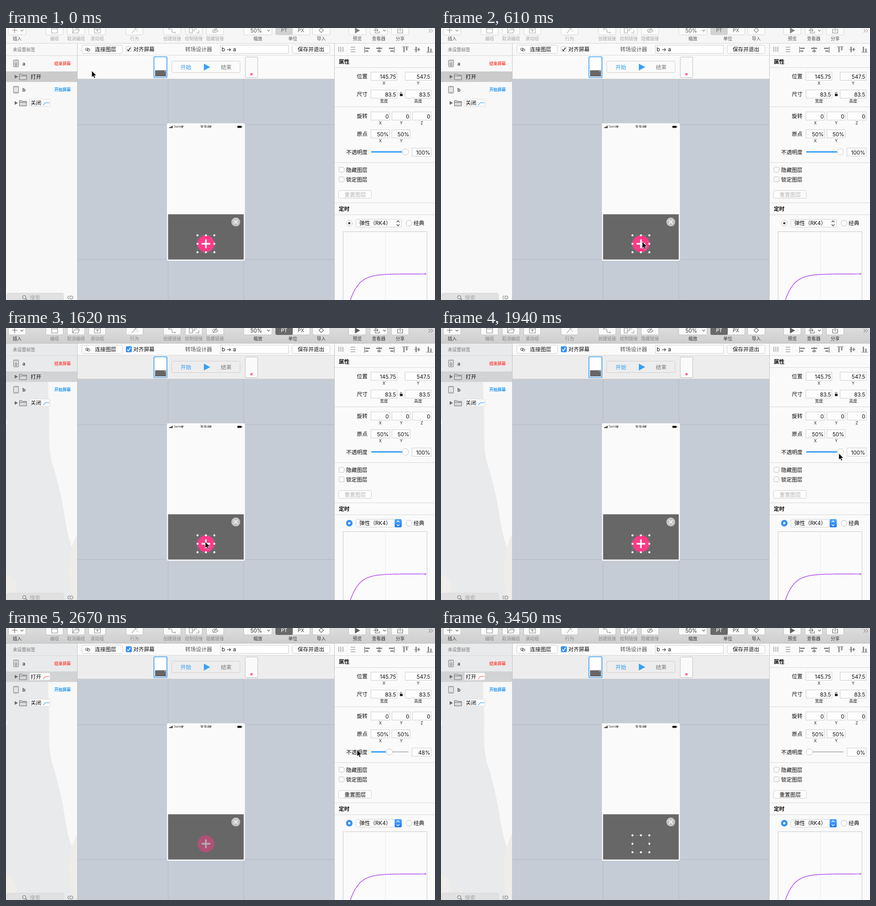
An HTML page that plays this animation: 941x595 px, repeating every 4050 ms.

```html
<!DOCTYPE html>
<html lang="zh-CN">
<head>
<meta charset="utf-8">
<title>转场设计器</title>
<style>
html, body { margin: 0; width: 100%; height: 100%; overflow: hidden; background: #fafafa }
svg { display: block; width: 100%; height: 100%; font-family: Inter, "Noto Sans CJK SC", "Noto Sans CJK", sans-serif;
  --bar: #f6f6f6; --barLow: #f6f6f6; --edge: #d6d6d6; --btn: #fbfbfb; --ink: #555; --icon: #858585; --dim: #a8a8a8;
  --sub: #fafafa; --row: #cbcbcb; --seg: #d2d2d2; --segInk: #777 }
svg.on { --bar: #dcdcdc; --barLow: #cfcfcf; --edge: #bdbdbd; --btn: #fafafa; --ink: #333; --icon: #5e5e5e; --dim: #888;
  --sub: #ededed; --row: #d2d3d4; --seg: #696969; --segInk: #fff }
svg:not(.on) .on, svg.on .off { display: none }
</style>
</head>
<body>
<svg id="stage" viewBox="0 0 941 595"></svg>
<script>
const stage = document.getElementById('stage');
const rect = (x, y, w, h, fill, stroke = 'none', r = 0, more = '') =>
  `<rect x="${x}" y="${y}" width="${w}" height="${h}" rx="${r}" style="fill:${fill};stroke:${stroke}" ${more}/>`;
const path = (d, stroke, width = 1, fill = 'none') =>
  `<path d="${d}" style="fill:${fill};stroke:${stroke};stroke-width:${width}"/>`;
const dot = (x, y, r, fill, stroke = 'none', more = '') =>
  `<circle cx="${x}" cy="${y}" r="${r}" style="fill:${fill};stroke:${stroke}" ${more}/>`;
// y is the middle of the line of text
const text = (s, x, y, size = 11.7, fill = '#0c0c0c', anchor = 'start', weight = 400, more = '') =>
  `<text x="${x}" y="${y + size * .365}" text-anchor="${anchor}" style="fill:${fill};font-size:${size}px;font-weight:${weight}" ${more}>${s}</text>`;
const mid = (s, x, y, size, fill, weight) => text(s, x, y, size, fill, 'middle', weight);
const group = (cls, ...parts) => `<g class="${cls}">${parts.join('')}</g>`;
const part = (id, ...parts) => `<g id="${id}">${parts.join('')}</g>`;
const hline = (x1, x2, y, c = '#d9d9d9') => rect(x1, y, x2 - x1, 1, c);
const vline = (x, y1, y2, c) => rect(x, y1, 1, y2 - y1, c);
const INK = 'var(--ink)', ICON = 'var(--icon)', DIM = 'var(--dim)';
const BLUE = '#2e9bf5', ACCENT = '#3490f8', RED = '#ff5048', LINE = '#cecece', PINK = '#ff3b87';

function toolbar() {
  const items = [ // label, left, width, enabled, icon
    ['插入', 5, 39, 1, 'M13 5h12M19-1v12M32 4l3 3 3-3'],
    ['编组', 87, 39, 0, 'M100-1h13v12h-13zM100 2h13'],
    ['取消编组', 134, 39, 0, 'M146 11V-1h5l2 2h6v3M146 11l4-7h11l-3 7z'],
    ['滚动组', 181, 38, 0, 'M194-1h13v12h-13zM194 2h13M200.500 4v5M198 6l2.500-2 2.500 2'],
    ['行为', 263, 38, 0, 'M276 11l8-9M282-1l2 3 3 1M288-1v2M288 6v2'],
    ['创建链接', 345, 39, 0, 'M357 2h4q3 0 3 4t3 4h4M371 8v4M357 0v4'],
    ['绘制链接', 393, 38, 0, 'M402 11V0h7v11zM409 6h4V2h6M417 11h6V5'],
    ['隐藏链接', 439, 39, 0, 'M452 6q6-8 13 0q-7 7-13 0M454 11l9-12M457 6a2 2 0 0 1 4 0'],
    ['缩放', 521, 63, 1, 'M573 4l3 3 3-3'],
    ['单位', 591, 76, 1, ''],
    ['导入', 672, 39, 1, 'M691.500 0l5 5-5 5-5-5z'],
    ['预览', 751, 39, 1, 'M766 0v11l9.500-5.500z'],
    ['查看器', 798, 39, 1, 'M815 0h-5v11h9V7M806 5h10M813 2l3 3-3 3M827 4l3 3 3-3'],
    ['分享', 845, 39, 1, 'M862 3h-3v8h11V3h-3M864.500 8V-2']
  ];
  const draw = ([label, x, w, on, icon]) => {
    const ink = on ? ICON : DIM;
    return rect(x + .5, -8.5, w - 1, 23.5, 'var(--btn)', 'var(--edge)', 3) +
      path(icon, ink, 1.1, label == '预览' ? ink : 'none') + mid(label, x + w / 2, 23, 9.8, on ? INK : DIM);
  };
  return rect(0, 0, 941, 33, 'url(#bar)') + items.map(draw).join('') +
    text('50%', 536, 5.5, 11.7, INK) + rect(591, -8, 38, 23, 'var(--seg)', 'none', 3) +
    mid('PT', 610, 5.5, 10.5, 'var(--segInk)', 500) + mid('PX', 647, 5.5, 10.5, INK) +
    path('M927 2l4 4-4 4M932 2l4 4-4 4', ICON) + hline(0, 941, 33, 'var(--edge)');
}

function folder(y) {
  return path(`M19 ${y - 4}v8l7-4z`, 'none', 0, '#6a6a6a') +
    path(`M29.500 ${y + 6.5}v-12h5l1.500 2h9v10zM29.500 ${y - 1.5}h15.500`, '#6b6b6b', 1, '#d8d8d8');
}
const device = y => rect(16.5, y - 7.5, 11, 15, '#e4e4e4', '#777', 1.5) +
  path(`M18 ${y - 5.5}h8M18 ${y + 5.5}h8`, '#999', .8);
const badge = (name, y, color) => rect(51.5, y - 8.5, 45, 16, '#fbfbfb', '#dcdcdc', 2) +
  text(name, 54, y) + path(`M82 ${y + 5}q2-5 6-5.500h7`, color, 1.2);

function sidebar() {
  return rect(0, 34, 156, 561, '#f8f8f8') +
    group('on', rect(0, 34, 156, 561, '#e9eaeb'),
      path('M92 118H156V505Q137 470 130 420T106 310Q92 280 95 200z', 'none', 0, '#f8f8f8'),
      path('M0 538Q30 550 22 595H0zM156 450Q135 490 138 545T156 595z', 'none', 0, '#efedea'),
      path('M0 200q5 6 0 14', 'none', 0, '#fafafa')) +
    rect(0, 95, 156, 23, 'var(--row)') + hline(0, 156, 60) +
    text('未设置标签', 15, 47, 9.8, '#9b9b9b', 'start', 700) +
    device(77.5) + path('M19 78l3-3 3 3M20 77v4h4v-4', '#555', .9) + text('a', 36, 77.5, 11, '#222', 'start', 500) +
    text('结束屏幕', 142, 77.5, 9, RED, 'end', 700) +
    folder(106.5) + text('打开', 54, 106.5) + part('badge', badge('打开', 106.5, RED)) +
    device(135) + text('b', 36, 135, 11, '#222', 'start', 500) + text('开始屏幕', 142, 135, 9, '#2397f3', 'end', 700) +
    folder(164) + badge('关闭', 164, BLUE) +
    rect(2, 580, 124, 20, '#e1e1e1', '#d6d6d6', 3) + dot(40, 589, 3.7, 'none', '#666') +
    path('M42.700 591.700l4 4', '#666', 1.3) + text('搜索', 52, 590, 11.7, '#aaa') +
    dot(143.5, 589.5, 3.5, 'none', '#666') + path('M139 586a3.500 3.500 0 0 0 0 7', '#666') +
    vline(156, 34, 595, '#c4c4c4');
}

function checkbox(x, y) {
  return rect(x + .5, y + .5, 11, 11, '#fff', '#bdbdbd', 2);
}

function editor() {
  const xs = [420, 438.5, 457], ys = [453.5, 472, 490.5];
  const handles = ys.flatMap(y => xs.map(x => x == xs[1] && y == ys[1] ? '' : dot(x, y, 2.2, '#fff'))).join('');
  const tick = 'M266 47l2.500 3 4.500-7';
  return rect(157, 112, 563, 483, '#c6ccd5') +
    [355, 521].map(x => vline(x, 112, 595, '#b3b9c2')).join('') +
    [211, 506].map(y => hline(157, 720, y, '#b3b9c2')).join('') +
    rect(157, 34, 563, 25, '#fafafa') + hline(157, 720, 59) + rect(157, 60, 563, 51, 'var(--sub)') + hline(157, 720, 111, LINE) +
    rect(166.5, 37.5, 89, 18, '#fdfdfd', LINE, 3) + rect(174.5, 44, 6, 5, 'none', '#333', 2.5) +
    rect(178, 45.5, 6, 5, 'none', '#333', 2.5) + text('连接图层', 195, 46.5) +
    checkbox(263, 40) + group('on', rect(263, 40, 13, 13, ACCENT, 'none', 2.5), path(tick, '#fff', 1.7)) +
    group('off', path(tick, '#222', 1.6)) + text('对齐屏幕', 279, 46.5) +
    text('转场设计器', 393, 46.5, 11.8, '#555', 'start', 500) + rect(470.5, 37.5, 149, 18, '#fff', LINE) +
    text('b → a', 473, 47) + rect(627.5, 37.5, 83, 18, '#fdfdfd', LINE, 3) + mid('保存并退出', 669, 46.5) +
    rect(324.5, 63, 28.5, 45.5, '#fff', '#3b9ef0', 2, 'stroke-width="1.7"') + rect(327, 92.5, 24, 13.5, '#666') + dot(348.5, 95, 1, '#ddd') +
    rect(363.5, 72.5, 150, 25, 'var(--sub)', LINE, 3) + mid('开始', 394.5, 85.5, 11.7, BLUE) +
    path('M434 78v15l14-7.500z', 'none', 0, '#37a1f6') + mid('结束', 483, 85.5, 11.7, '#777') +
    rect(525, 63.5, 27, 45, '#fafafa', '#bdbdbd', 2) + dot(538.5, 101, 2.5, PINK) + dot(538.5, 101, .8, '#fff') +
    // phone
    rect(353, 208.5, 171, 300.5, '#fff', '#d9dce1', 2, 'stroke-width=".6"') + rect(355, 211, 167, 296, '#fafafa') +
    [0, 1, 2, 3].map(i => rect(358 + i * 2, 217 - i, 1.5, 2 + i, '#222')).join('') + text('Tavrio', 367.5, 216, 5.6, '#333') +
    path('M383.500 215.500q3-3 6 0M384.800 217q1.700-1.700 3.400 0', '#222', 1.1) + dot(386.5, 218.3, .8, '#222') +
    mid('10:10 AM', 438.5, 216, 5.5, '#222', 600) + rect(507.5, 214, 9, 4.5, '#111', 'none', 1) + rect(517, 215.3, 1, 2, '#111') +
    rect(355.5, 407.5, 166, 99, '#676767') + dot(504, 424.3, 9.7, '#c4c4c4') +
    path('M500 420.300l8 8M508 420.300l-8 8', '#fff', 1.6) +
    part('plus', dot(438.5, 472, 18.5, PINK), path('M438.500 462.500v19M429 472h19', '#fff', 3.4)) +
    part('handles', rect(420, 453.5, 37, 37, 'none', '#8a8a8a', 0, 'stroke-width=".5"'), handles);
}

function panel() {
  const label = (s, y) => text(s, 793, y, 11.7, undefined, 'end');
  const title = (s, y) => text(s, 730, y, 11.7, undefined, 'start', 700);
  const field = (x, w, y, value, id = '') => rect(x + .5, y - 9, w - 1, 18, '#fdfdfd', LINE) +
    text(value, x + w - 2.5, y + 1, 11.7, undefined, 'end', 400, id);
  const note = (s, x, y) => mid(s, x, y, 8.8, '#222');
  const pair = (y, a, b) => field(800, 58, y, a) + field(875, 58, y, b);
  const small = [[800, 42], [846, 41], [891, 42]];
  const trio = (y, values) => values.map((v, i) => field(...small[i], y, v) + note('XYZ'[i], small[i][0] + 21, y + 15.5)).join('');
  const spread = 'M730 41v11M734.500 41v11M739 41v11M756 42h10M756 47h10M756 52h10';
  const axes = 'M786.500 41v13M818.500 41v13M851.500 41v13M869 41h14M895 47h14M922 53h14';
  const bars = 'M788 44.500h10M788 50.500h7M812 44.500h13M814.500 50.500h8M840 44.500h10M843 50.500h7' +
    'M873 42v11M879 42v7M899.500 41v12M905 43.500v7M926.500 41v11M932 45v7';
  let curve = 'M751 611';
  for (let x = 752; x <= 920; x += 2) curve += `L${x} ${538 + 57 * Math.exp((755.5 - x) / 19.5)}`;
  const arrows = 'M857 425l3-3.500 3 3.500M857 429.500l3 3.500 3-3.500';
  return rect(720, 34, 221, 561, '#fafafa') + vline(720, 34, 595, '#c4c4c4') +
    path(spread, '#a4a4a4', 1.6) + path(axes, '#666', 1.2) + path(bars, '#8c8c8c', 3) +
    [60, 86, 172, 294, 382, 408].map(y => hline(721, 941, y)).join('') +
    title('属性', 73.5) + title('定时', 396) +
    label('位置', 106) + pair(105.5, '145.75', '547.5') + note('X', 829, 121) + note('Y', 904, 121) +
    label('尺寸', 145) + pair(144.5, '83.5', '83.5') + note('宽度', 829, 160) + note('高度', 904, 160) +
    rect(864, 144, 6, 5, '#222') + path('M865 144v-1.500a1.800 1.800 0 0 1 3.600 0', '#222') +
    label('旋转', 192.5) + trio(192.5, [0, 0, 0]) + label('原点', 231.5) + trio(231.5, ['50%', '50%']) +
    label('不透明度', 272) + rect(801, 270, 82, 2, '#b9b9b9', 'none', 1) +
    rect(801, 269.5, 75, 3, BLUE, 'none', 1.5, 'id="fill"') + dot(876, 271, 7, '#fdfdfd', '#c6c6c6', 'id="knob"') +
    field(890, 43, 271.5, '100%', 'id="value"') +
    checkbox(730, 304) + text('隐藏图层', 746, 310.5) + checkbox(730, 325) + text('锁定图层', 746, 331.5) +
    rect(729.5, 355.5, 72, 17, '#fdfdfd', LINE, 3) + text('重置图层', 766, 364.5, 11.7, undefined, 'middle', 400, 'id="reset"') +
    dot(753, 427, 6.5, '#fff', '#bbb') + group('on', dot(753, 427, 7.2, ACCENT)) +
    group('off', dot(753, 427, 2.5, '#444')) + group('on', dot(753, 427, 2.5, '#fff')) +
    rect(767.5, 418.5, 100, 17, '#fdfdfd', LINE, 3) + text('弹性（RK4）', 775, 427) +
    group('on', rect(852.5, 418, 15.5, 18, 'url(#popup)', 'none', 3), path(arrows, '#fff', 1.3)) + group('off', path(arrows, '#444', 1.3)) +
    dot(884, 427, 6.5, '#fff', '#bbb') + text('经典', 894, 427) +
    rect(739.5, 445.5, 184, 170, '#fbfbfb', '#c9c9c9') + vline(832, 446, 595, '#e9e9e9') +
    path(curve, '#b95ff5', 1.7) + dot(920, 538, 1.8, '#b95ff5');
}

const shade = (id, from, to) => `<linearGradient id="${id}" x2="0" y2="1">
  <stop style="stop-color:${from}"/><stop offset="1" style="stop-color:${to}"/></linearGradient>`;

stage.innerHTML = shade('bar', 'var(--bar)', 'var(--barLow)') + shade('popup', '#55a7fb', '#1b78f7') +
  editor() + sidebar() + panel() + toolbar() +
  part('cursor', path('M0 0v14.500l3.300-3.100 2.200 5 2.500-1.100-2.200-4.800h4.600z', '#fff', .9, '#000'));

const $ = id => document.getElementById(id);
const show = (id, on) => $(id).style.display = on ? '' : 'none';
const LOOP = 4050;
// time, x and y of the pointer tip
const pointer = [
  [0, 188, 93.5], [140, 224, 202], [320, 451, 411], [460, 441, 448], [610, 441.5, 467.5],
  [1620, 437, 467.5], [1790, 509.5, 437], [1940, 872.5, 274], [2080, 861, 287], [2230, 858, 286],
  [2370, 868, 270], [2670, 770, 266.5], [2820, 766, 267], [3150, 801, 313], [3300, 859, 406.5]
];

function render(t) {
  const [, x, y] = pointer.findLast(p => p[0] <= t);
  const opacity = t < 2670 ? 1 : t < 2820 ? .48 : 0;
  const knobX = 808 + 68 * opacity;
  stage.classList.toggle('on', t >= 1320);
  $('cursor').setAttribute('transform', `translate(${x} ${y})`);
  show('cursor', t < 3450);
  show('badge', t >= 2670);
  show('handles', t < 2670 || t >= 3150);
  $('plus').style.opacity = opacity;
  $('knob').setAttribute('cx', knobX);
  $('fill').setAttribute('width', knobX - 801);
  $('value').textContent = Math.round(opacity * 100) + '%';
  $('reset').style.fill = t < 2670 ? '#b4b4b4' : '#0c0c0c';
}

const start = performance.now();
function tick() {
  render((performance.now() - start) % LOOP);
  requestAnimationFrame(tick);
}
tick();
</script>
</body>
</html>
```
